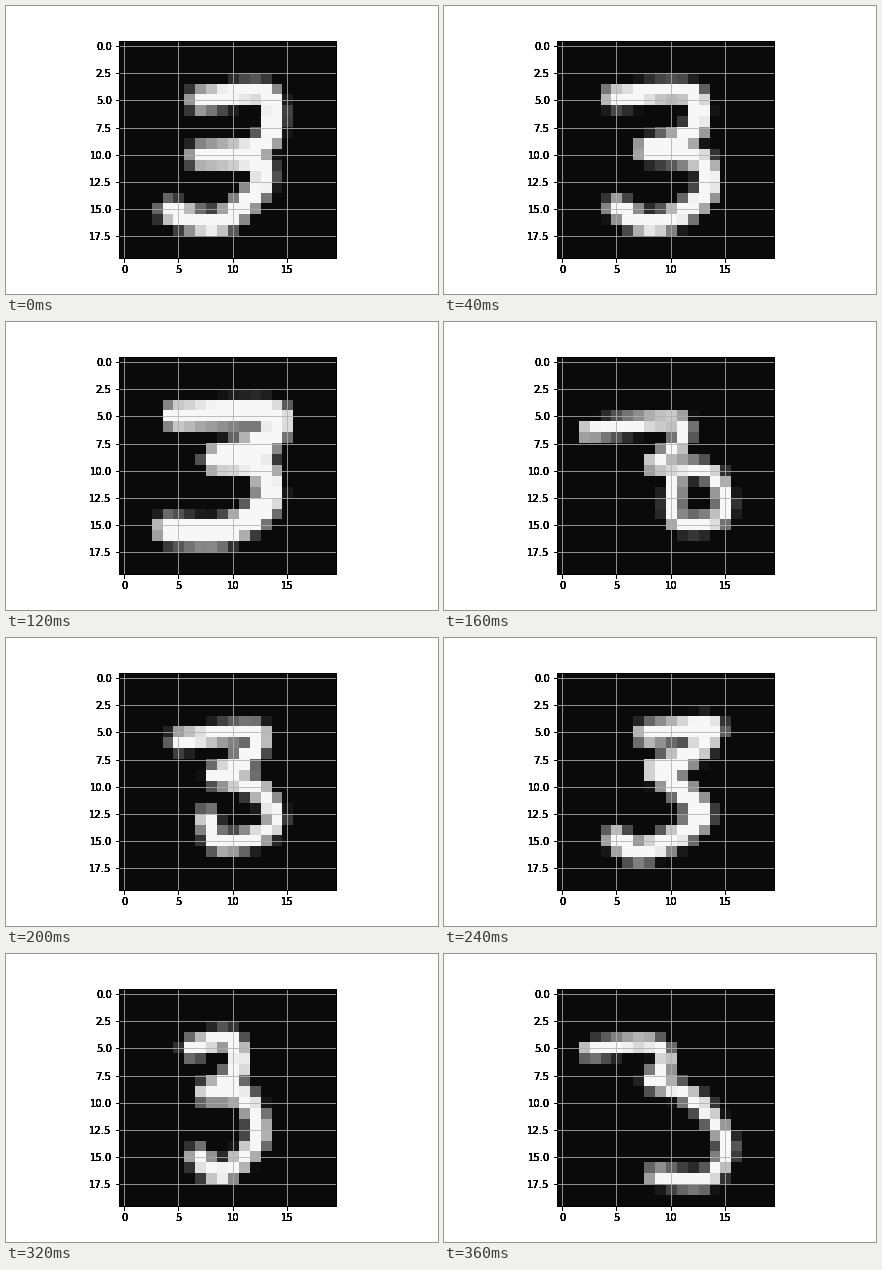
These frames come from a looping animation (432x288 px, 0.4 s). A matplotlib script:

```python
import numpy as np
import matplotlib.pyplot as plt
from matplotlib.animation import FuncAnimation

N = 20
BLACK, WHITE = 0.042, 0.965
WAIST = 3  # key point where the two bowls of a three meet
yy, xx = np.mgrid[0:N, 0:N]


def spline(keys, steps=24):
    """Catmull-Rom curve through the key points."""
    slopes = np.gradient(keys, axis=0)
    slopes[[0, -1]] /= 2
    t = np.linspace(0, 1, steps)[:, None]
    ease = t * t * (3 - 2 * t)
    return np.vstack([
        a + (b - a) * ease + ma * t * (1 - t) ** 2 - mb * t * t * (1 - t)
        for a, b, ma, mb in zip(keys, keys[1:], slopes, slopes[1:])])


def pen(width, *keys):
    return width, np.array(keys, float)


def between(p, q):
    return (p[0] + q[0]) / 2, (p[1] + q[1]) / 2


def draw(width, keys):
    """Soft brush along both bowls, sampled on the cell grid."""
    path = np.vstack([spline(keys[:WAIST + 1]), spline(keys[WAIST:])])
    dist = np.hypot(xx[..., None] - path[:, 0], yy[..., None] - path[:, 1])
    ink = np.clip(width - dist.min(axis=-1), 0, 1)
    return BLACK + (WHITE - BLACK) * ink


square = pen(1.6, (7, 5), (13, 4.5), (12.8, 9), (7, 10.1),
             (12, 10.6), (12.3, 13), (8.5, 16.3), (4.2, 15.2))
flat = pen(1.45, (2.5, 4.5), (10.3, 4.3), (11.2, 6.8), (8.5, 9),
           (13.2, 10.4), (13.9, 14.3), (8.5, 16.5), (5.8, 14.6))
heavy = pen(1.8, (4.8, 5), (13.5, 4.8), (13, 7.2), (8.5, 9),
            (12.4, 9.6), (13, 13), (9, 15.6), (4, 15.4))
looped = pen(1.3, (2.3, 6.4), (10.3, 5.5), (10.7, 7.5), (8.3, 9.4),
             (13.8, 10.4), (14.6, 14.2), (10.5, 14.6), (10.3, 11))
knotted = pen(1.55, (7.8, 5.2), (13.6, 4.5), (12.2, 6.7), (8.5, 8.5),
              (11, 10.4), (12.6, 13), (7.5, 15.9), (4.9, 14.8))
narrow = pen(1.45, (6.3, 5), (9.6, 4.2), (10.4, 7), (7.6, 9.1),
             (11, 9.6), (12.2, 13.2), (9, 16.5), (6.8, 15))
thin = pen(1.3, (2.5, 5.2), (7.8, 4.6), (9.5, 6.2), (8.2, 8),
           (12.2, 9.8), (15, 13.8), (13.2, 17), (8.6, 16.7))

pens = [square, between(square, flat), flat, heavy, looped,
        between(looped, knotted), knotted, between(knotted, narrow),
        narrow, thin]
digits = [draw(*p) for p in pens]

plt.rcParams.update({"font.family": "DejaVu Sans", "font.size": 10})
fig = plt.figure(figsize=(6, 4), dpi=72, facecolor="white")
fig.subplots_adjust(left=0.125, right=0.9, bottom=0.125, top=0.88)


def add_layer():
    ax = fig.add_subplot()
    ax.patch.set_visible(False)
    ax.set(xlim=(-0.5, N - 0.5), ylim=(N - 0.5, -0.5), aspect="equal",
           xticks=np.arange(0, N, 5), yticks=np.arange(0, N, 2.5))
    return ax


ax = add_layer()
image = ax.imshow(digits[0], cmap="gray", vmin=0, vmax=1, interpolation="nearest")
ax.grid(True, color="#b0b0b0", linewidth=0.8)

# Stacked axes darken the antialiased labels.
for _ in range(6):
    add_layer()


def update(i):
    image.set_data(digits[i])
    return [image]


anim = FuncAnimation(fig, update, frames=len(digits), interval=40,
                     repeat=True, repeat_delay=0, blit=False)
plt.show()
```
